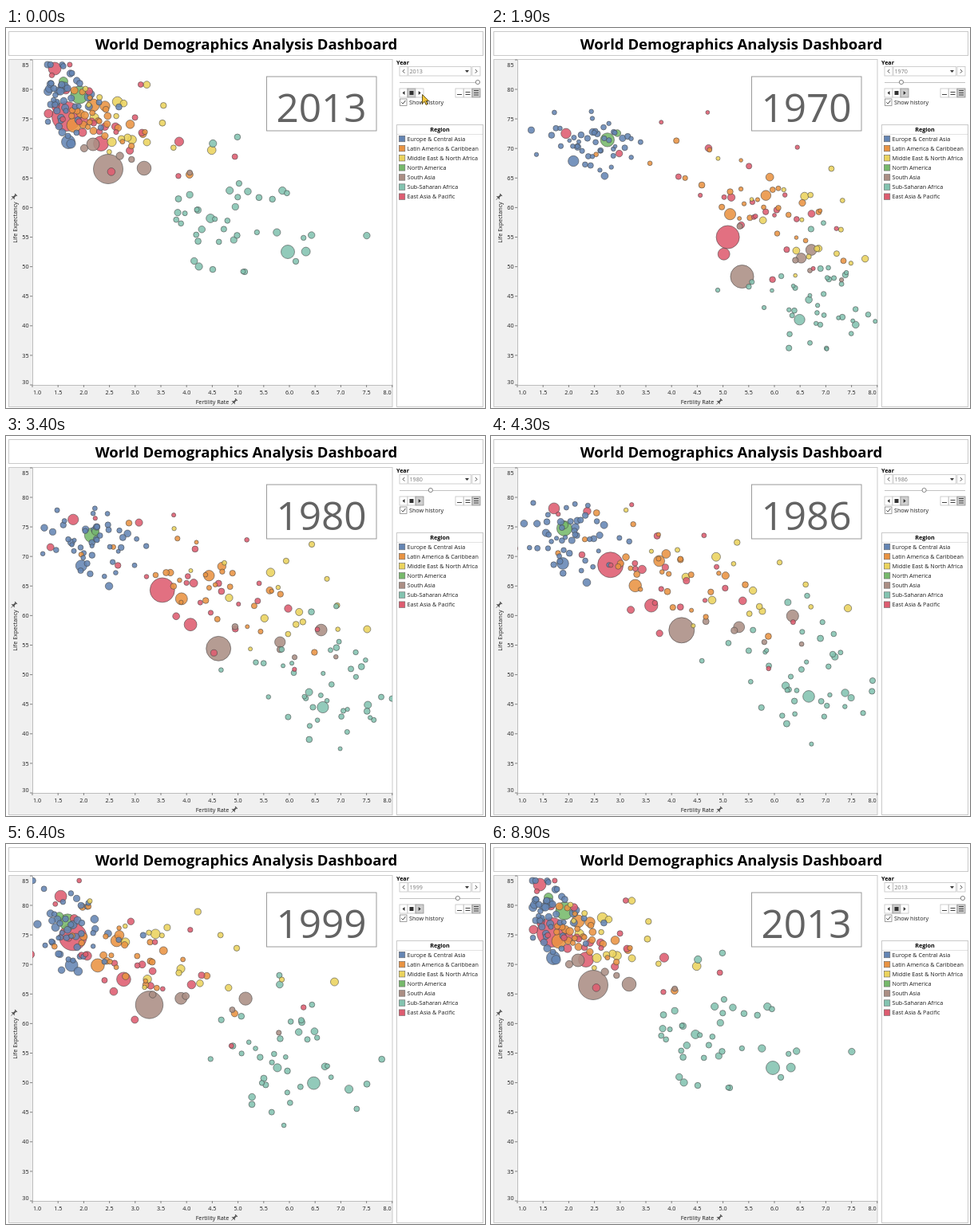
These frames come from a looping animation (600x477 px, 9000 ms). An HTML page:

```html
<!DOCTYPE html>
<html lang="en">
<head>
<meta charset="utf-8">
<title>World Demographics Analysis Dashboard</title>
<style>
  html, body { margin: 0; width: 100%; height: 100%; overflow: hidden; background: #fff; }
  svg { display: block; }
  text { font: 7.2px "Open Sans", "Noto Sans", sans-serif; fill: #1c1c1c; }
  .title { font-size: 18.55px; font-weight: 700; fill: #000; }
  .head { font-weight: 700; fill: #000; }
  .big { font-size: 49.5px; fill: #636363; }
  .mid { text-anchor: middle; }
  .end { text-anchor: end; }
  .soft { fill: #777; }
  .frame { fill: none; stroke: #cacaca; }
  .tick { stroke: #777; stroke-width: .9; }
  .button { fill: #fff; stroke: #c4c4c4; stroke-width: .8; }
  .button.on { fill: #cfcfcf; stroke: #8f8f8f; }
  .icon { fill: #333; }
  .line { fill: none; stroke: #444; stroke-width: 1; }
  .bubble { fill-opacity: .88; stroke: #444; stroke-opacity: .75; stroke-width: .75; }
</style>
</head>
<body>
<svg width="600" height="477" viewBox="0 0 600 477">
  <defs>
    <clipPath id="plot"><rect x="33" y="40" width="451" height="408"/></clipPath>
    <g id="pin" transform="rotate(45)">
      <path d="M-2-4h4v1h-1v3l2 2h-6l2-2v-3h-1z" fill="#555"/>
      <path d="M0 2v3" stroke="#555" stroke-width=".8"/>
    </g>
  </defs>
  <rect width="600" height="477" fill="#fff"/>
  <rect class="frame" x="3.5" y="4.5" width="594" height="30"/>
  <text class="title mid" x="301" y="27">World Demographics Analysis Dashboard</text>

  <path d="M4 40H33V448H484V476H4z" fill="#f0f0f0"/>
  <rect class="frame" x="3.5" y="39.5" width="480.5" height="436"/>
  <path d="M33.5 40V448.5H484" fill="none" stroke="#bdbdbd"/>
  <g id="axes"></g>
  <text class="mid" x="258.5" y="472">Fertility Rate</text>
  <use href="#pin" transform="translate(286 469)"/>
  <text class="mid" transform="translate(14 244) rotate(-90)">Life Expectancy</text>
  <use href="#pin" transform="translate(10 212)"/>

  <g id="bubbles" clip-path="url(#plot)"></g>
  <rect x="326.5" y="61" width="137.5" height="68" fill="#fff" stroke="#9a9a9a"/>
  <text id="year" class="big mid" x="395" y="118"></text>

  <text class="head" x="489" y="46">Year</text>
  <rect class="button" x="493" y="48.5" width="10" height="11.5"/>
  <rect class="button" x="504" y="48.5" width="78.5" height="11.5"/>
  <rect class="button" x="584" y="48.5" width="10" height="11.5"/>
  <path class="line" d="M499.3 52l-2.3 2.3 2.3 2.3M587.8 52l2.3 2.3-2.3 2.3"/>
  <path class="icon" d="M575 53h5l-2.5 3z"/>
  <text id="pick" class="soft" x="505.5" y="57"></text>
  <path d="M493 68.5H594" stroke="#c2c2c2"/>
  <circle id="knob" cy="68" r="2.6" fill="#fff" stroke="#777" stroke-width=".9"/>
  <rect class="button" x="493" y="76" width="10" height="11"/>
  <rect id="stop" class="button" x="503" y="76" width="10" height="11"/>
  <rect id="play" class="button" x="513" y="76" width="10" height="11"/>
  <path class="icon" d="M499.5 79v5l-3-2.5zM505.5 79h5v5h-5zM516.7 79v5l3-2.5z"/>
  <rect class="button" x="563" y="76" width="10" height="11"/>
  <rect class="button" x="573.5" y="76" width="10" height="11"/>
  <rect class="button on" x="584" y="76" width="10" height="11"/>
  <path class="line" d="M565 83.5h6M575.5 80.5h6M575.5 83.5h6M586 78.5h6M586 81.3h6M586 84h6"/>
  <rect x="493.5" y="89" width="8.5" height="8.5" fill="#fff" stroke="#888" stroke-width=".8"/>
  <path class="line" d="M495.3 93.2l2 2 3-4.2"/>
  <text x="505" y="96">Show history</text>

  <rect class="frame" x="489.5" y="121.5" width="108" height="354"/>
  <path d="M490 133.5H597" stroke="#e2e2e2"/>
  <text class="head mid" x="543.5" y="130.3">Region</text>
  <g id="legend"></g>
  <path id="cursor" d="M521.5 83.5v11.2l2.7-2.4 2 4.2 1.8-.9-2-4.1h3.6z" fill="#f2c63c" stroke="#5b4a18" stroke-width=".9"/>
</svg>
<script>
const $ = id => document.getElementById(id);

function add(parent, tag, attrs, text) {
  const el = document.createElementNS("http://www.w3.org/2000/svg", tag);
  for (const k in attrs) el.setAttribute(k, attrs[k]);
  if (text !== undefined) el.textContent = text;
  parent.append(el);
  return el;
}

let seed = 48;
function rand() {
  seed = (seed * 16807) % 2147483647;
  return seed / 2147483647;
}
const bell = () => (rand() + rand() + rand() - 1.5) * 2;
const clamp = (v, lo, hi) => Math.max(lo, Math.min(hi, v));

const FIRST = 1965, MIDDLE = 1986, FINAL = 2013;

// Parabola through the values at the three key years.
function curve(a, b, c, year) {
  const ab = (b - a) / (MIDDLE - FIRST);
  const bc = (c - b) / (FINAL - MIDDLE);
  const bend = (bc - ab) / (FINAL - FIRST);
  return a + (year - FIRST) * (ab + bend * (year - MIDDLE));
}

const COLORS = {
  "Europe & Central Asia": "#6485b4",
  "Latin America & Caribbean": "#e99342",
  "Middle East & North Africa": "#ebd35d",
  "North America": "#76b96b",
  "South Asia": "#ab8e84",
  "Sub-Saharan Africa": "#83c3b0",
  "East Asia & Pacific": "#de5c70"
};
const [EUROPE, LATIN, MIDEAST, NORTH, SOUTH, AFRICA, EAST] = Object.values(COLORS);
const bubbles = [];

// A large country: final radius and its place in each key year.
function country(color, size, a, b, c) {
  bubbles.push({
    color, size,
    at: year => [0, 1].map(i => curve(a[i], b[i], c[i], year))
  });
}

// Many small countries: centre x, y and spread x, y in each key year;
// tie is how strongly x and y go together.
function crowd(color, count, tie, a, b, c) {
  const cross = Math.sqrt(1 - tie * tie);
  for (let i = 0; i < count; i++) {
    const p = (i + .5) / count;
    const u0 = Math.log(p / (1 - p)) / 1.75, v0 = bell(), phase = rand() * 6.28;
    bubbles.push({
      color,
      size: 3 + 1.7 * rand() + 2 * rand() ** 5,
      at(year) {
        const [x, y, sx, sy] = a.map((_, k) => curve(a[k], b[k], c[k], year));
        const u = u0 + .2 * Math.sin(phase + year * .16);
        const v = v0 + .25 * Math.cos(phase * 3 + year * .13);
        const skew = .2 * (year - MIDDLE) / 24;
        const w = u + skew * (u * u - 1);
        return [x + sx * w, Math.max(46, y + sy * (tie * w + cross * v))];
      }
    });
  }
}

crowd(EUROPE, 48, .3, [138, 150, 34, 15], [98, 128, 30, 24], [76, 92, 18, 26]);
crowd(LATIN, 27, .7, [378, 226, 60, 32], [215, 165, 62, 32], [122, 114, 30, 19]);
crowd(MIDEAST, 18, .4, [430, 280, 28, 38], [305, 178, 72, 36], [155, 120, 42, 26]);
crowd(EAST, 24, .6, [372, 232, 55, 50], [215, 185, 78, 50], [128, 122, 56, 34]);
crowd(AFRICA, 42, .1, [400, 362, 38, 32], [395, 303, 48, 42], [290, 245, 58, 38]);
crowd(SOUTH, 4, .5, [390, 325, 40, 45], [330, 265, 65, 45], [160, 175, 55, 20]);

country(EAST, 18.5, [366, 310], [150, 162], [76, 111]);
country(EAST, 9.5, [331, 314], [201, 213], [119, 145]);
country(EAST, 8, [100, 150], [79, 91], [61, 51]);
country(SOUTH, 18.5, [343, 341], [239, 244], [128, 177]);
country(SOUTH, 8.8, [393, 301], [378, 226], [173, 176]);
country(SOUTH, 8, [409, 305], [311, 240], [109, 146]);
country(NORTH, 11, [174, 150], [92, 116], [92, 84]);
country(NORTH, 5.5, [191, 138], [92, 112], [72, 67]);
country(LATIN, 9, [352, 251], [181, 188], [85, 122]);
country(LATIN, 8, [404, 232], [211, 157], [109, 97]);
country(EUROPE, 8.5, [109, 169], [90, 160], [78, 143]);
country(AFRICA, 8.5, [376, 382], [398, 327], [353, 281]);

bubbles.sort((a, b) => b.size - a.size);
for (const b of bubbles) b.el = add($("bubbles"), "circle", { class: "bubble", fill: b.color });

for (let i = 0; i < 15; i++) {
  const x = 33 + i * 32.2;
  add($("axes"), "path", { d: `M${x} 448v3`, class: "tick" });
  add($("axes"), "text", { x: clamp(x, 39, 477.5), y: 460, class: "mid" }, (1 + i / 2).toFixed(1));
}
for (let v = 30; v <= 85; v += 5) {
  const y = 77 + (80 - v) * 7.42;
  add($("axes"), "path", { d: `M30 ${clamp(y, 40, 448)}h3`, class: "tick" });
  add($("axes"), "text", { x: 28.5, y: clamp(y, 46.5, 444) + 2.6, class: "end" }, v);
}
Object.entries(COLORS).forEach(([name, fill], i) => {
  const y = 135.3 + i * 12.1;
  add($("legend"), "rect", { x: 492.3, y, width: 7.5, height: 7.5, fill, stroke: "#666", "stroke-width": .6 });
  add($("legend"), "text", { x: 502.5, y: y + 6.4 }, name);
});

const LOOP = 9000, STEP = 100, PLAY_FROM = 300, YEARS_PER_MS = .0065;

function draw(t) {
  const waiting = t < PLAY_FROM;
  const now = waiting ? FINAL : Math.min(FINAL, 1960.05 + (t - PLAY_FROM) * YEARS_PER_MS);
  const year = Math.floor(now);
  const playing = now < FINAL;
  $("year").textContent = $("pick").textContent = year;
  $("knob").setAttribute("cx", 505 + (year - FIRST) * 1.79);
  $("play").classList.toggle("on", playing);
  $("stop").classList.toggle("on", !playing);
  $("cursor").style.display = waiting ? "" : "none";
  const growth = .76 + .24 * (now - FIRST) / (FINAL - FIRST);
  for (const b of bubbles) {
    const [x, y] = b.at(now);
    b.el.setAttribute("cx", x.toFixed(2));
    b.el.setAttribute("cy", y.toFixed(2));
    b.el.setAttribute("r", (b.size * growth).toFixed(2));
  }
}

const start = performance.now();
let last = -1;
function tick() {
  const t = Math.floor((performance.now() - start) % LOOP / STEP) * STEP;
  if (t !== last) draw(last = t);
  requestAnimationFrame(tick);
}
tick();
</script>
</body>
</html>
```
